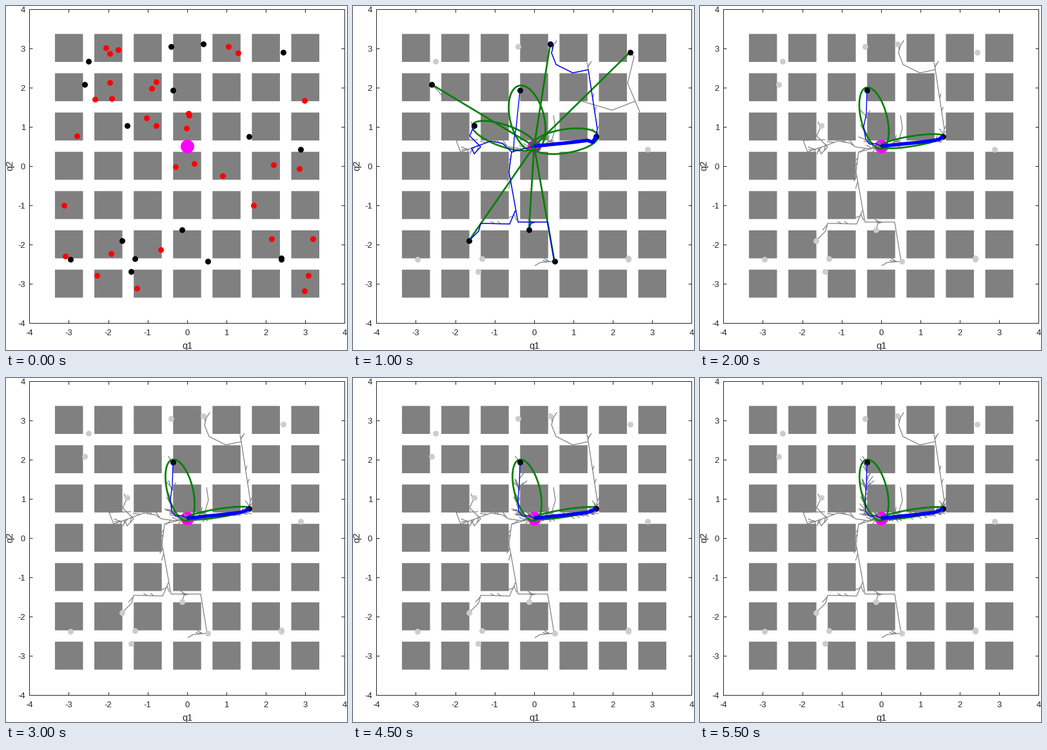
Write a matplotlib script that moves like this. It is 529 px wide and 535 px high and loops after 6000 ms.

```python
import math
import random

import matplotlib.pyplot as plt
import numpy as np
from matplotlib.animation import ArtistAnimation
from matplotlib.patches import Rectangle

W, H, DPI = 529, 535, 100
PX = 72 / DPI
STEPS = 12
CENTER, UNIT, HALF = (281, 248.5), 61.1, 21.75
GRAY, LIGHT, INK = "#808080", "#cccccc", "#262626"
GREEN, BLUE, MAGENTA = "#008000", "#0000ff", "#ff00ff"
plt.rcParams["font.family"] = "Liberation Sans"

HOME = (281, 218)
TOP, RIGHT, LEFT = (259, 131), (377, 202.5), (188, 186)
SOLVED_ONCE = [(306, 58.5), (122, 122), (430, 71.5), (273, 348), (180, 365), (312.5, 397)]
UNSOLVED = [(128, 86), (256, 63), (456.5, 223), (100, 394), (200, 392.5),
            (193.5, 412.5), (427, 391.5), (427, 394)]

# Routes run outwards from the root of the search tree
NORTH = [RIGHT, (379, 191), (365, 99), (341, 104), (315, 91), (308, 73), (311, 61), (306, 58)]
SOUTH = [HOME, (246, 227), (242, 258), (256, 336), (302, 336), (312, 397)]
SOUTH_WEST = [(252, 318), (243, 339), (198, 338), (195, 350), (180, 365)]
SOUTH_MID = [(283, 336), (276, 338), (273, 348)]
WEST_END = [(214, 210), (184, 221), (188, 230), (198, 219), (181, 202), LEFT]
WEST = [HOME, (262, 222), (241, 219), (232, 213)] + WEST_END
SIDE_BRANCHES = [[(184, 221), (167, 227), (160, 209), (194, 208)],
                 [(312, 397), (290, 399), (282, 404)], [(365, 99), (363, 88)],
                 [(300, 213), (309, 207), (314, 190), (311, 170)]]
PRUNED = [[(122, 122), (134, 134), (138, 140)],
          [(430, 71), (436, 79), (426, 120), (445, 165)],
          [(438, 148), (402, 162), (355, 148)]]


def blocked_samples(count=33):
    """Random samples that fall on an obstacle."""
    rng = random.Random(8)
    samples = []
    while len(samples) < count:
        q1, q2 = rng.uniform(-3.2, 3.2), rng.uniform(-3.2, 3.2)
        if max(abs(q1 - round(q1)), abs(q2 - round(q2))) < 0.35:
            samples.append((CENTER[0] + UNIT * q1, CENTER[1] - UNIT * q2))
    return samples


def sprouts(route, count, longest=12):
    """Short twigs leaning forward from a route; a larger count only adds twigs."""
    rng = random.Random(4)
    points = np.array(route)
    twigs = []
    for _ in range(count):
        i, u = rng.randrange(len(points) - 1), rng.random()
        x, y = points[i] + u * (points[i + 1] - points[i])
        dx, dy = points[i + 1] - points[i]
        angle = math.atan2(dy, dx) + rng.choice((-1, 1)) * rng.uniform(0.3, 0.9)
        size = rng.uniform(6, longest)
        twigs.append([(x, y), (x + size * math.cos(angle), y + size * math.sin(angle))])
    return twigs


def ellipse(goal, semi_major):
    """Ellipse with its foci at HOME and goal."""
    dx, dy = goal[0] - HOME[0], goal[1] - HOME[1]
    span = math.hypot(dx, dy)
    ux, uy = dx / span, dy / span
    t = np.linspace(0, math.tau, 121)
    p = semi_major * np.cos(t)
    q = math.sqrt(semi_major ** 2 - span ** 2 / 4) * np.sin(t)
    x = (HOME[0] + goal[0]) / 2 + p * ux - q * uy
    y = (HOME[1] + goal[1]) / 2 + p * uy + q * ux
    return list(zip(x, y))


def top_route(step):
    bend = 4 * 0.8 ** (step - 3)
    return [HOME, (273, 214), (263, 215), (257, 207), (257 - bend, 188), (258, 168), TOP]


def right_route(step):
    sag = 6 * 0.4 ** (step - 2)
    return [HOME, (340, 212), (364, 209), (372, 206 + sag), RIGHT]


fig = plt.figure(figsize=(W / 100, H / 100), dpi=DPI, facecolor="white")
ax = fig.add_axes([0, 0, 1, 1])
ax.set_xlim(0, W)
ax.set_ylim(H, 0)
ax.axis("off")


def lines(paths, color, width, z):
    return [ax.plot(*zip(*path), color=color, lw=width * PX, zorder=z,
                    solid_capstyle="butt", solid_joinstyle="round")[0] for path in paths]


def dots(points, color, diameter, z):
    x, y = zip(*points)
    return [ax.scatter(x, y, s=(diameter * PX) ** 2, color=color, linewidths=0, zorder=z)]


def draw_axes():
    left, top, right, bottom = 36.3, 4.7, 525.3, 492.7
    ax.add_patch(Rectangle((left, top), right - left, bottom - top, fill=False,
                           ec=INK, lw=PX, zorder=10))
    for k in range(9):
        x, y = left + 61.125 * k, top + 61 * k
        lines([[(x, top), (x, top + 5)], [(x, bottom), (x, bottom - 5)],
               [(left, y), (left + 5, y)], [(right, y), (right - 5, y)]], INK, 1, 10)
        style = dict(color=INK, fontsize=13 * PX, va="center_baseline")
        ax.text(x, 507.5, str(k - 4), ha="center", **style)
        ax.text(30, y + 1, str(4 - k), ha="right", **style)
    style = dict(color=INK, fontsize=14.5 * PX, ha="center", va="center")
    ax.text(281, 528.5, "q1", **style)
    ax.text(6.5, 248, "q2", rotation=90, **style)
    for i in range(-3, 4):
        for j in range(-3, 4):
            corner = (CENTER[0] + UNIT * i - HALF, CENTER[1] + UNIT * j - HALF)
            ax.add_patch(Rectangle(corner, 2 * HALF, 2 * HALF, fc=GRAY, lw=0,
                                   snap=False, zorder=1))


def draw_sampling(step):
    goals = UNSOLVED + SOLVED_ONCE + [LEFT, TOP, RIGHT]
    artists = dots(goals, "black", 9, 8) + dots([HOME], MAGENTA, 21, 9)
    if step == 0:
        artists += dots(blocked_samples(), "red", 9, 9)
    return artists


def draw_search(step):
    tree = [NORTH, SOUTH, SOUTH_WEST, SOUTH_MID, WEST] + SIDE_BRANCHES
    for route in list(tree):
        tree += sprouts(route, len(route))
    active, idle = [TOP, RIGHT], list(UNSOLVED)
    top, right = top_route(step), right_route(step)

    if step == 2:
        tree += PRUNED
        top = [(249, 226), (250, 206), (253, 190), TOP]
        blue = [top, NORTH, SOUTH, SOUTH_WEST, SOUTH_MID, [(246, 227), (232, 214)] + WEST_END]
        green = [[HOME, goal] for goal in SOLVED_ONCE]
        green += [ellipse(goal, 52) for goal in (TOP, LEFT, RIGHT)]
        active += SOLVED_ONCE + [LEFT]
    else:
        count = 7 * (step - 2)
        tree += sprouts(top_route(STEPS), count, 18) + sprouts(right_route(STEPS), count)
        excess = 0.5 * 0.6 ** (step - 3)
        blue = [top]
        green = [ellipse(TOP, 49 + excess / 2), ellipse(RIGHT, 48.95 + excess)]
        idle += SOLVED_ONCE
        if step == 3:
            blue.append(WEST)
            green.append([HOME, LEFT])
            active.append(LEFT)
        else:
            idle.append(LEFT)

    return (dots([HOME], MAGENTA, 21, 2) + lines(tree, GRAY, 1.25, 3)
            + dots(idle, LIGHT, 9, 4) + lines(green, GREEN, 2.7, 5)
            + dots(active, "black", 9, 6) + lines(blue, BLUE, 1.4, 7)
            + lines([right], BLUE, 5.5, 8))


draw_axes()
frames = [draw_sampling(step) if step < 2 else draw_search(step) for step in range(STEPS)]
anim = ArtistAnimation(fig, frames, interval=500, repeat=True, repeat_delay=0, blit=False)
plt.show()
```
